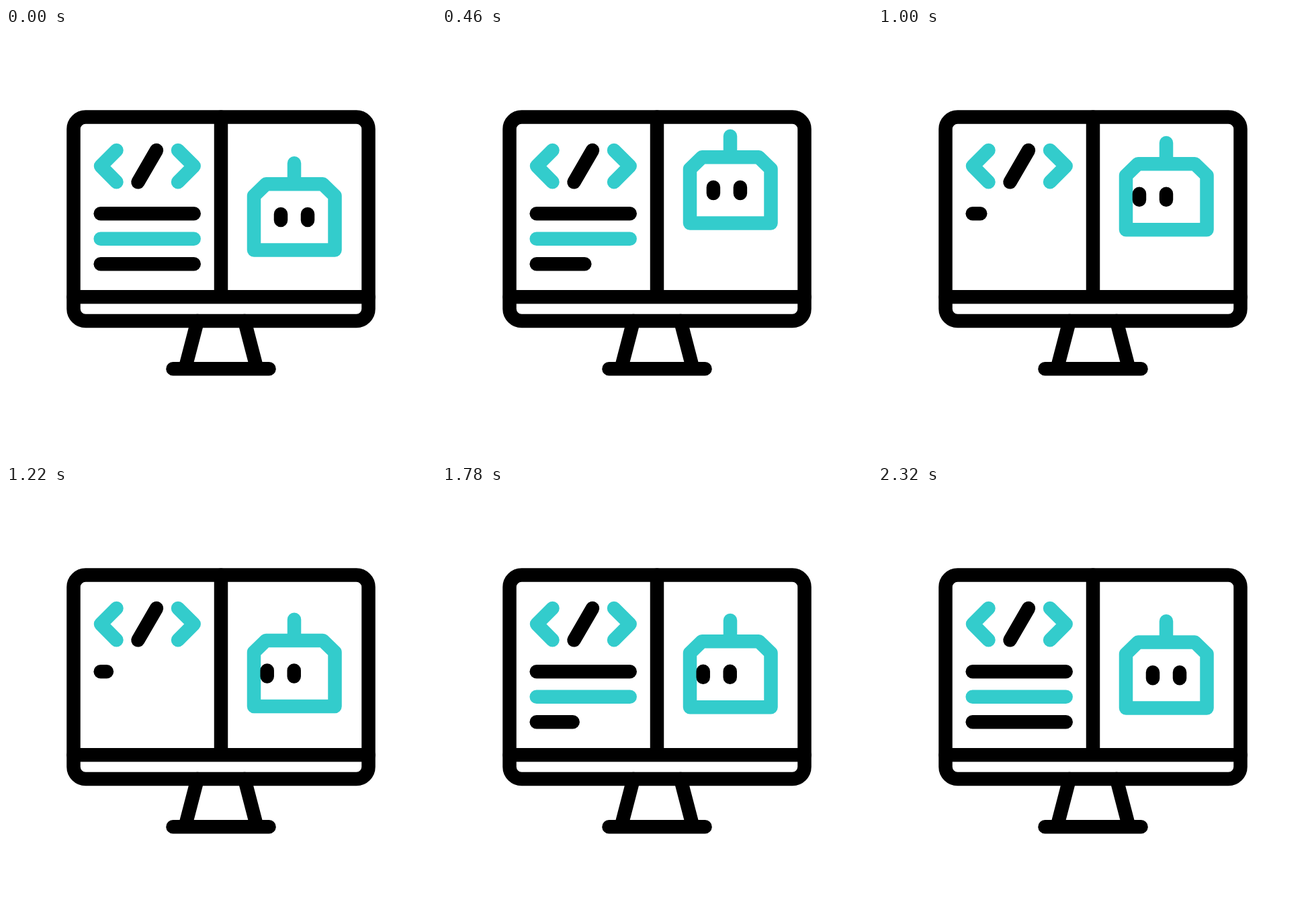
These frames come from a looping animation (640x640 px, 2400 ms). An HTML page:

```html
<!DOCTYPE html>
<html lang="en">
<head>
<meta charset="utf-8">
<title>Coding robot</title>
<style>
  html, body { margin: 0; height: 100%; overflow: hidden; background: #fff; }
  svg { display: block; width: 100%; height: 100%; }
  path, rect { fill: none; stroke: #000; stroke-width: 20.5; stroke-linecap: round; stroke-linejoin: round; }
  .accent { stroke: #3cc; }
</style>
</head>
<body>
<svg viewBox="0 0 640 640">
  <path d="M285 436L266.5 507M355 436L373.5 507M248.5 507.3H391.5"/>
  <rect x="100.5" y="132.5" width="439" height="303.5" rx="18"/>
  <path d="M100.5 400.3H539.7M320 132.5V400.3"/>

  <path class="accent" d="M164.5 182L141 205.5L164.5 229.3M256 182L279.7 205.5L256 229.3"/>
  <path d="M224 182L196.5 229.3"/>

  <path class="line"/>
  <path class="line accent"/>
  <path class="line"/>

  <g id="robot">
    <path class="accent" d="M429 201.3V232.5M387 232.5H471.5L489.5 250V330.6H369V250Z"/>
    <path id="eyes" d="M409 277.2V286.2M449 277.2V286.2"/>
  </g>
</svg>
<script>
const LOOP = 2400;
const LINE_LENGTH = 139;
const lines = document.querySelectorAll('.line');
const robot = document.getElementById('robot');
const eyes = document.getElementById('eyes');

const progress = (t, start, end) => Math.min(1, Math.max(0, (t - start) / (end - start)));

// Symmetric cubic-bezier(p, 0, 1 - p, 1)
function ease(x, p) {
  let low = 0, high = 1, s;
  for (let i = 0; i < 24; i++) {
    s = (low + high) / 2;
    const r = 1 - s;
    if (3 * p * s * r * r + 3 * (1 - p) * s * s * r + s * s * s < x) low = s;
    else high = s;
  }
  return s * s * (3 - 2 * s);
}

function jumpHeight(t) {
  if (t < 600) return 43.3 * (1 - (1 - t / 600) ** 1.8);
  if (t < 1200) return 43.3 * (1 - progress(t, 600, 1200) ** 3);
  if (t < 1520) return 20.6 * (1 - (1 - progress(t, 1200, 1520)) ** 2);
  return 20.6 * (1 - progress(t, 1520, 1790) ** 2);
}

// Number of code lines visible: erased from the last, retyped from the first
function visibleLines(t) {
  const erased = ease(progress(t, 0, 1140), 0.861) - ease(progress(t, 1150, 2250), 0.85);
  return 3 - 2.94 * erased;
}

function draw(t) {
  const count = visibleLines(t);
  lines.forEach((line, i) => {
    const part = Math.min(1, count - i);
    line.setAttribute('d', part > 0 ? `M140.7 ${276.2 + 37.5 * i}h${part * LINE_LENGTH}` : '');
  });
  const look = ease(progress(t, 0, 1140), 0.67) - ease(progress(t, 1780, 2320), 0.67);
  robot.setAttribute('transform', `translate(0 ${-jumpHeight(t)})`);
  eyes.setAttribute('transform', `translate(${-20.3 * look} 0)`);
}

function tick() {
  draw(performance.now() % LOOP);
  requestAnimationFrame(tick);
}
tick();
</script>
</body>
</html>
```
